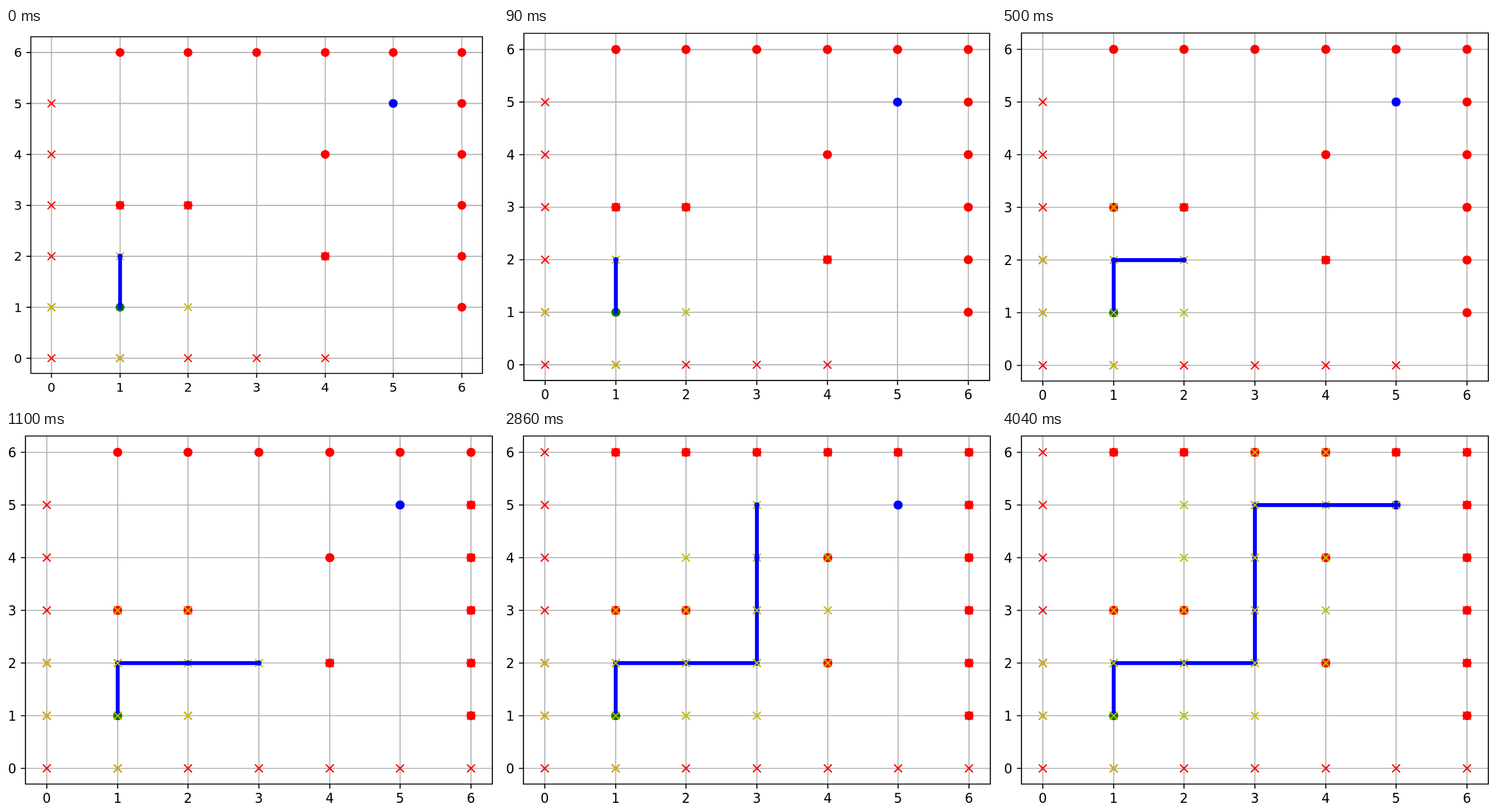
Recreate the animation shown at these times as an HTML page. Size 784x598 px, loop 5790 ms.

```html
<!DOCTYPE html>
<html lang="en">
<head>
<meta charset="utf-8">
<title>Grid path search</title>
<style>
  html, body { margin: 0; width: 100%; height: 100%; overflow: hidden; background: #fff; }
  svg { display: block; width: 784px; height: 598px; }
  text { font: 20.83px "DejaVu Sans", sans-serif; }
</style>
</head>
<body>
<svg viewBox="0 0 784 598"><g id="plot"></g></svg>
<script>
const LOOP = 5790;
const RED = '#f00', BLUE = '#00f', GREEN = '#008000', YELLOW = '#bfbf00';
const AXES = { left: 31, right: 775, top: 8, bottom: 563 };
const THIN = 1.67;
const plot = document.getElementById('plot');
const timed = [];

const px = i => Math.round(65 + i * 676 / 6);
const py = j => 538 - 84 * j;

// Every element becomes visible at its own time within the loop.
function add(tag, attrs, at = 0) {
  const el = document.createElementNS('http://www.w3.org/2000/svg', tag);
  for (const key in attrs) el.setAttribute(key, attrs[key]);
  plot.appendChild(el);
  if (at) timed.push({ el, at });
  return el;
}

const stroke = (d, color, width, at, cap = 'butt') =>
  add('path', { d, stroke: color, 'stroke-width': width, 'stroke-linecap': cap, fill: 'none' }, at);

const dot = ([i, j], color, r, at) =>
  add('circle', { cx: px(i), cy: py(j), r, fill: color }, at);

const cross = ([i, j], color, at) => {
  const h = 6.25;
  stroke(`M${px(i) - h} ${py(j) - h}l${2 * h} ${2 * h}m0 ${-2 * h}l${-2 * h} ${2 * h}`, color, 2.08, at);
};

const label = (value, x, y, anchor) =>
  add('text', { x, y, 'text-anchor': anchor }).textContent = value;

const range = (from, to, make) =>
  Array.from({ length: to - from + 1 }, (_, k) => make(from + k));

function drawAxes() {
  const { left, right, top, bottom } = AXES;
  for (let k = 0; k <= 6; k++) {
    stroke(`M${px(k)} ${top}V${bottom}M${left} ${py(k)}H${right}`, '#b0b0b0', THIN);
    stroke(`M${px(k)} ${bottom}v7.3M${left} ${py(k)}h-7.3`, '#000', THIN);
    label(k, px(k), 592.8, 'middle');
    label(k, 16.4, py(k) + 7.6, 'end');
  }
}

function drawFrame() {
  const { left, right, top, bottom } = AXES;
  stroke(`M${left} ${top}H${right}V${bottom}H${left}Z`, '#000', THIN, 0, 'square');
}

const obstacles = [
  ...range(1, 6, i => [i, 6]),
  ...range(1, 5, j => [6, j]),
  [1, 3], [2, 3], [4, 2], [4, 4],
];

const route = [[1, 1], [1, 2], [2, 2], [3, 2], [3, 3], [3, 4], [3, 5], [4, 5], [5, 5]];

// When each cell is explored, and when the segment leaving it is drawn.
const schedule = [
  [0, 0], [400, 500], [1000, 1100], [1580, 1680],
  [2170, 2270], [2750, 2860], [3350, 3430], [3940, 4040],
];

// Blocked cells discovered at each step.
const discovered = [
  [...range(0, 4, i => [i, 0]), ...range(1, 5, j => [0, j]), [1, 3], [2, 3], [4, 2]],
  [[5, 0], [0, 2]],
  range(0, 5, j => [6, j]),
  range(0, 6, i => [i, 6]),
];

function drawSearch() {
  obstacles.forEach(cell => dot(cell, RED, 7.3));
  dot(route[0], GREEN, 7.3);
  dot(route[route.length - 1], BLUE, 7.3);
  schedule.forEach(([explored, moved], n) => {
    const [i, j] = route[n], next = route[n + 1];
    (discovered[n] || []).forEach(cell => cross(cell, RED, explored));
    [[i - 1, j], [i + 1, j], [i, j + 1], [i, j - 1]].forEach(cell => cross(cell, YELLOW, explored));
    dot(next, BLUE, 4.17, explored);
    stroke(`M${px(i)} ${py(j)}L${px(next[0])} ${py(next[1])}`, BLUE, 6.25, moved, 'square');
  });
}

// The window eases up to full size in a few discrete steps.
const zoomTimes = [0, 30, 60, 90, 110, 140];

function render(t) {
  const step = zoomTimes.filter(z => z <= t).pop();
  const rest = Math.max(0, 1 - step / 125) ** 2;
  plot.setAttribute('transform',
    `translate(${9.6 * rest} ${6.2 * rest}) scale(${1 - 0.0327 * rest})`);
  for (const { el, at } of timed) el.setAttribute('visibility', t >= at ? 'visible' : 'hidden');
}

drawAxes();
drawSearch();
drawFrame();

const start = performance.now();
function tick() {
  render((performance.now() - start) % LOOP);
  requestAnimationFrame(tick);
}
render(0);
requestAnimationFrame(tick);
</script>
</body>
</html>
```
